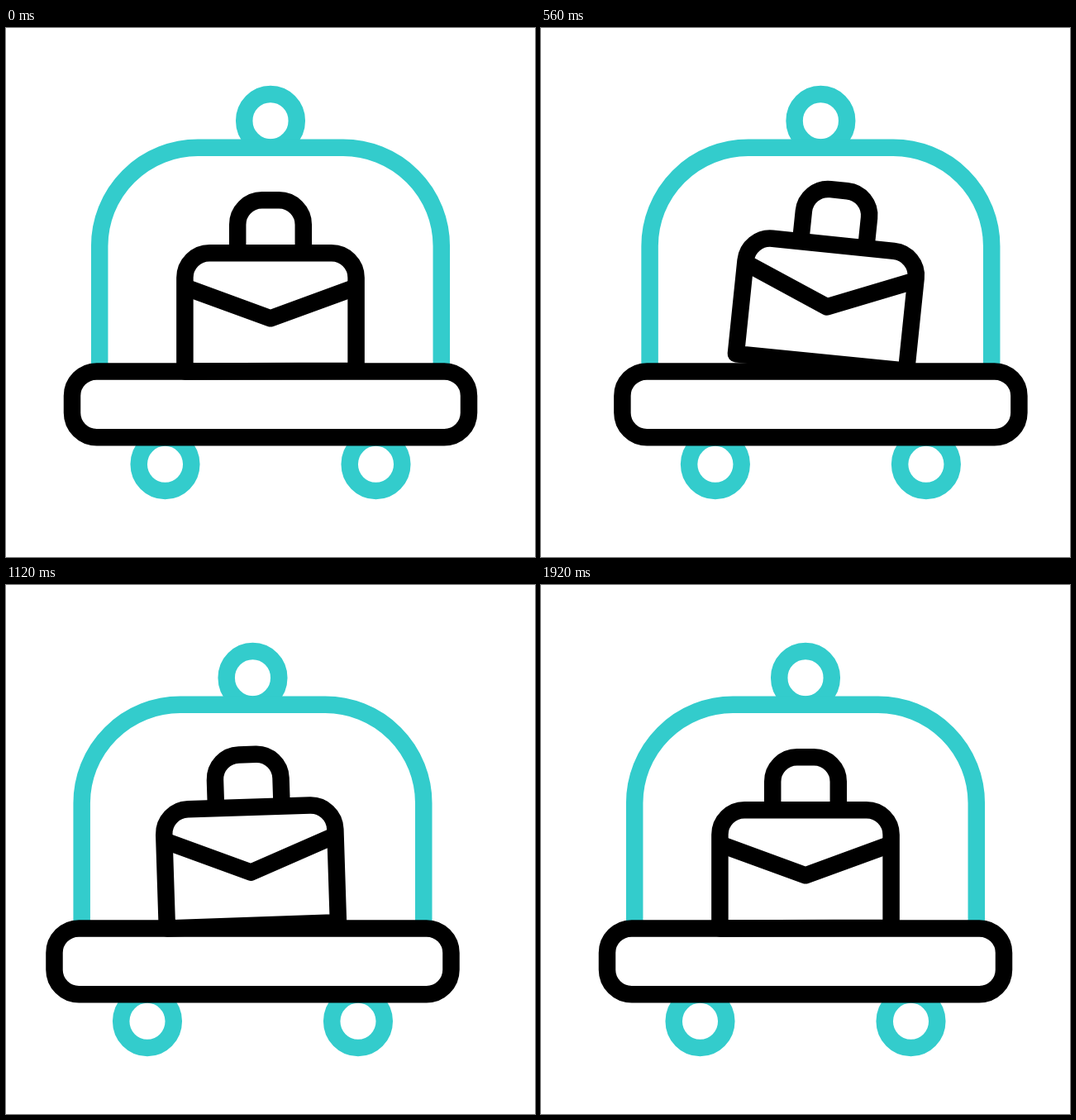
Recreate the animation shown at these times as an HTML page with a canvas. Size 640 px wide and 640 px high, loop 2000 ms.

```html
<!DOCTYPE html>
<html lang="en">
<head>
<meta charset="utf-8">
<title>Luggage cart</title>
<style>
  html, body { margin: 0; width: 100%; height: 100%; overflow: hidden; background: #fff; }
  canvas { display: block; width: 100vmin; height: 100vmin; }
</style>
</head>
<body>
<canvas id="stage" width="640" height="640"></canvas>
<script>
const ctx = document.getElementById('stage').getContext('2d');
const LOOP = 2000, STEP = 40, LINE = 20.5;
const TEAL = '#33cccc', BLACK = '#000';
const LEFT = 216.4, RIGHT = 423.6, FLOOR = 415.2;

// The cart sets off, turns at the right, turns at the left and comes to rest.
const GO = 80, TURN = 720, BACK = 1240, REST = 1920;
const LAND = 1400, SETTLE = 1560;
const REACH_RIGHT = 21.8, REACH_LEFT = 28.3;
const MAX_TILT = 7, BACK_LEAN = 0.46;

const phase = (t, a, b) => Math.min(1, Math.max(0, (t - a) / (b - a)));

function ease(t, a, b) {
  const u = phase(t, a, b);
  return u * u * (3 - 2 * u);
}

// Runs from 0 to right, then to -left, then home again.
function sway(t, right, left, end) {
  return right * ease(t, GO, TURN)
    - (right + left) * ease(t, TURN, BACK)
    + left * ease(t, BACK, end);
}

function stroke(color, trace) {
  ctx.strokeStyle = color;
  ctx.beginPath();
  trace();
  ctx.stroke();
}

function ring(x, y) {
  stroke(TEAL, () => ctx.ellipse(x, y, 31.8, 32.3, 0, 0, Math.PI * 2));
}

// Open arch with rounded shoulders.
function arch(x0, x1, top, y0, y1, r) {
  ctx.moveTo(x0, y0);
  ctx.arcTo(x0, top, x0 + r, top, r);
  ctx.arcTo(x1, top, x1, top + r, r);
  ctx.lineTo(x1, y1);
}

// The bag tips over one lower corner, stretches with the lean and squashes on landing.
function drawBag(t) {
  const lean = sway(t, 1, BACK_LEAN, LAND);
  const fore = Math.max(lean, 0), back = Math.max(-lean, 0);
  const squash = Math.sin(Math.PI * phase(t, BACK, SETTLE));
  const sink = 1.2 * squash;
  const handle = 2.8 * squash - 3 * fore;
  const tip = sink - 4.3 * fore - 1.5 * back;
  const flap = tip - 6 * fore - 14 * back;
  const pivot = lean > 0 ? RIGHT : LEFT;

  ctx.save();
  ctx.translate(pivot, FLOOR);
  ctx.rotate(lean * MAX_TILT * Math.PI / 180);
  ctx.translate(-pivot, -FLOOR);

  stroke(BLACK, () => arch(280.2, 359.8, 208.3 + handle, 272.3, 272.3, 29.6));
  stroke(BLACK, () => {
    arch(LEFT, RIGHT, 272.2 + sink, FLOOR + 0.4, FLOOR - 0.4, 29.8);
    ctx.closePath();
  });
  stroke(BLACK, () => {
    ctx.moveTo(LEFT, 313.5 + flap);
    ctx.lineTo(320, 351.3 + tip);
    ctx.lineTo(RIGHT, 313.5 + flap);
  });
  ctx.restore();
}

function draw(t) {
  ctx.fillStyle = '#fff';
  ctx.fillRect(0, 0, 640, 640);
  ctx.lineWidth = LINE;
  ctx.lineJoin = 'round';

  ctx.save();
  ctx.translate(sway(t, REACH_RIGHT, REACH_LEFT, REST), 0);
  ring(320, 112.2);
  ring(192.5, 527.8);
  ring(447.5, 527.8);
  stroke(TEAL, () => arch(113.2, 526.8, 144.8, FLOOR, FLOOR, 119));
  drawBag(t);
  stroke(BLACK, () => ctx.roundRect(80, 415.4, 480, 79.9, 29.7));
  ctx.restore();
}

const start = performance.now();
function tick() {
  const t = (performance.now() - start) % LOOP;
  draw(Math.floor(t / STEP) * STEP);
  requestAnimationFrame(tick);
}
tick();
</script>
</body>
</html>
```
